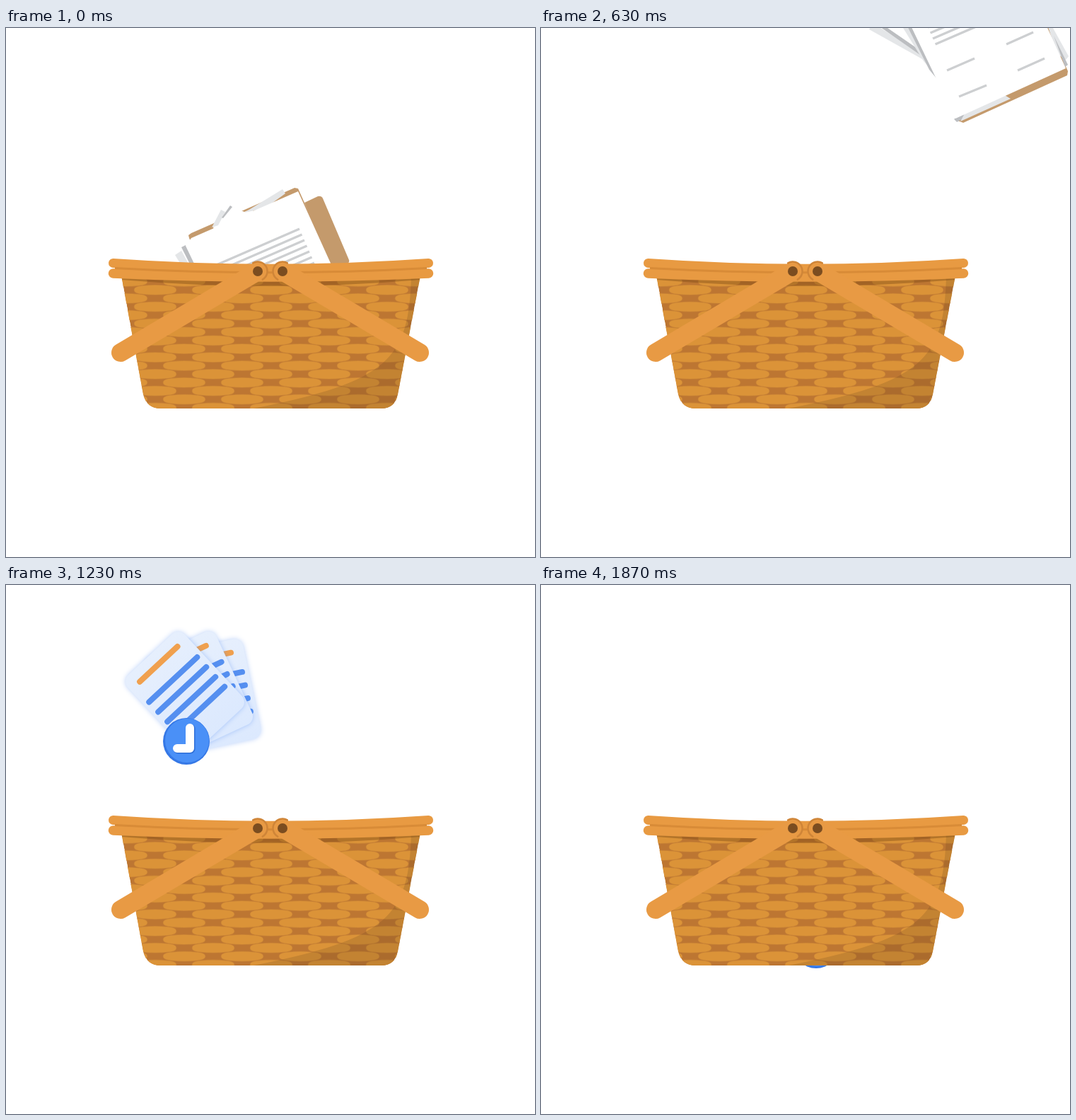
These frames come from a looping animation (748x748 px, 2210 ms). An HTML page with a canvas:

```html
<!DOCTYPE html>
<html lang="en">
<head>
<meta charset="utf-8">
<title>Basket</title>
<style>
  html, body { margin: 0; height: 100%; overflow: hidden; background: #fff; }
  canvas { display: block; width: 100vw; height: 100vh; }
</style>
</head>
<body>
<canvas id="stage" width="748" height="748"></canvas>
<script>
const ctx = document.getElementById('stage').getContext('2d');
const LOOP = 2210, STEP = 100 / 3;

// Keys: [step, x, x speed, y, y speed]
const papersPath = [[0, -104, 0, 207, 2], [8, -72, 10, 122, 19 * -1], [13, 0, 19, 0, -28], [23, 231, 27, -308, -33]];
papersPath[0][4] = -2;
const cardsPath = [[29, -281, 50, -143, 14], [37, 0, 18, 0, 23], [46, 109, 5.5, 206, 17], [56, 134, 0, 288, 0]];

function hermite(a, va, b, vb, span, u) {
  const w = 1 - u;
  return a * (1 + 2 * u) * w * w + va * span * u * w * w
       + b * u * u * (3 - 2 * u) - vb * span * u * u * w;
}

function positionAt(path, n) {
  let i = 0;
  while (i < path.length - 2 && n > path[i + 1][0]) i++;
  const a = path[i], b = path[i + 1], span = b[0] - a[0];
  const u = Math.min(1, Math.max(0, (n - a[0]) / span));
  return [1, 3].map(k => hermite(a[k], a[k + 1], b[k], b[k + 1], span, u));
}

function fill(d, color) {
  ctx.fillStyle = color;
  ctx.fill(new Path2D(d));
}

function stroke(d, color, width, cap = 'butt') {
  ctx.strokeStyle = color;
  ctx.lineWidth = width;
  ctx.lineCap = cap;
  ctx.lineJoin = 'round';
  ctx.stroke(new Path2D(d));
}

function disc(x, y, r, color) {
  ctx.fillStyle = color;
  ctx.beginPath();
  ctx.arc(x, y, r, 0, 7);
  ctx.fill();
}

function at(x, y, draw) {
  ctx.save();
  ctx.translate(x, y);
  draw();
  ctx.restore();
}

function drawPapers() {
  const tan = '#c49a6c', pale = '#e4e6e8', gray = '#bcbec1', line = '#cdcfd1';
  // Folder with its side tab
  fill('M363 90L362 86L366 83L512 19L517 20L616 240L615 246L468 313L460 310Z', tan);
  fill('M526 40L545 31Q550 30 552 34L589 121Q590 124 587 126L566 136Z', tan);
  // Loose sheets on the right
  fill('M572 141L580 145L577 148L585 155L583 158L572 151Z', gray);
  fill('M580 152L617 219L613 224L600 215Z', pale);
  fill('M596 190L616 231L612 234Z', gray);
  // Loose sheets on the left
  fill('M335 181L340 172L412 217V224Z', pale);
  fill('M337 168L341 165L408 211L407 217Z', gray);
  fill('M341 165L352 118L420 225L409 212Z', '#fff');
  fill('M343 114L352 108L425 240L412 226Z', pale);
  fill('M352 103L358 100L430 250L420 238Z', gray);
  // Loose sheets at the top
  fill('M397 74L422 45L441 53L453 48L455 60L400 90Z', '#fff');
  fill('M395 75L408 50L414 53L404 72Z', pale);
  fill('M421 44L424 46L411 62L409 61Z', gray);
  fill('M441 54L495 21L499 27L470 48Z', pale);
  // Sheets at the bottom, then the front sheet
  fill('M455 308L459 312L480 301L470 295Z', gray);
  fill('M464 311L535 279L520 270L470 300Z', pale);
  fill('M358 101L366 90L517 24L613 236L457 307Z', '#fff');
  for (let i = 0; i < 10; i++) {
    at(i * 3.5, i * 8, () => stroke('M397 130L519 77', line, 3.4));
  }
  stroke('M529 202L567 185M445 239L484 222M545 239L583 222M462 276L501 260', line, 3.2);
}

function drawCard(x, y, degrees) {
  at(x, y, () => {
    ctx.rotate(degrees * Math.PI / 180);
    const paper = ctx.createLinearGradient(0, -72, 0, 72);
    paper.addColorStop(0, '#e6effd');
    paper.addColorStop(1, '#dce9fe');
    ctx.save();
    ctx.shadowColor = 'rgba(70,130,240,.38)';
    ctx.shadowBlur = 7;
    ctx.fillStyle = paper;
    ctx.beginPath();
    ctx.roundRect(-55, -72, 110, 144, 13);
    ctx.fill();
    ctx.restore();
    stroke('M-37 -54H36', '#f0a04e', 8, 'round');
    for (let i = 0; i < 4; i++) stroke(`M-47 ${i * 19 - 24}H46`, '#558ff0', 8, 'round');
  });
}

function drawCards() {
  drawCard(294, 156, -12);
  drawCard(273, 150, -25);
  drawCard(253, 151, -43);
  disc(255, 221, 33, '#3578e6');
  disc(256, 220, 31, '#4a90f7');
  stroke('M261 203V232H243', '#2f6fd8', 13, 'round');
  stroke('M260 202V231H242', '#fff', 12, 'round');
}

function drawWeave() {
  const strand = 'M-29.5 0C-29.5 -4 -24 -5 -18 -5.6Q0 -7.6 18 -5.6C24 -5 29.5 -4 29.5 0'
               + 'C29.5 4 24 5 18 5.6Q0 7.6 -18 5.6C-24 5 -29.5 4 -29.5 0Z';
  for (let row = 0; row < 16; row++) {
    for (let col = 0; col < 6; col++) {
      at(170 + col * 82 + row % 2 * 41, 358.5 + row * 11.9, () => {
        stroke(strand, '#c98335', 1.6);
        fill(strand, '#db9338');
      });
    }
  }
}

function drawArm() {
  stroke('M356 344L162 459', '#e89a44', 26, 'round');
  ctx.strokeStyle = '#cf8538';
  ctx.lineWidth = 2.5;
  ctx.beginPath();
  ctx.arc(356, 344, 13.5, -2.1, 1.05);
  ctx.stroke();
  disc(356, 344, 7, '#7b4d20');
}

function drawBasket() {
  ctx.save();
  const body = 'M163 350H586L554 518Q550 538 531 538H218Q199 538 194 518Z';
  ctx.clip(new Path2D(body));
  fill(body, '#bd7632');
  drawWeave();
  fill('M163 350H586V356Q375 374 163 356Z', 'rgba(125,72,20,.42)');
  fill('M573 350C570 470 540 500 350 538H570L592 350Z', 'rgba(100,65,25,.2)');
  ctx.restore();

  const rim = '#e89a42';
  stroke('M151.5 332.5Q374 348 597.5 332.5', rim, 13, 'round');
  stroke('M151.5 347Q374 357 597.5 347', rim, 13.5, 'round');
  stroke('M154 339.5Q374 352 595 339.5', '#d88b37', 3);

  drawArm();
  at(747, 0, () => {
    ctx.scale(-1, 1);
    drawArm();
  });
}

function render(now) {
  const n = Math.floor((now % LOOP + 5) / STEP);
  ctx.fillStyle = '#fff';
  ctx.fillRect(0, 0, 748, 748);
  if (n < 24) at(...positionAt(papersPath, n), drawPapers);
  if (n >= 29) at(...positionAt(cardsPath, n), drawCards);
  drawBasket();
  requestAnimationFrame(render);
}

render(0);
</script>
</body>
</html>
```
